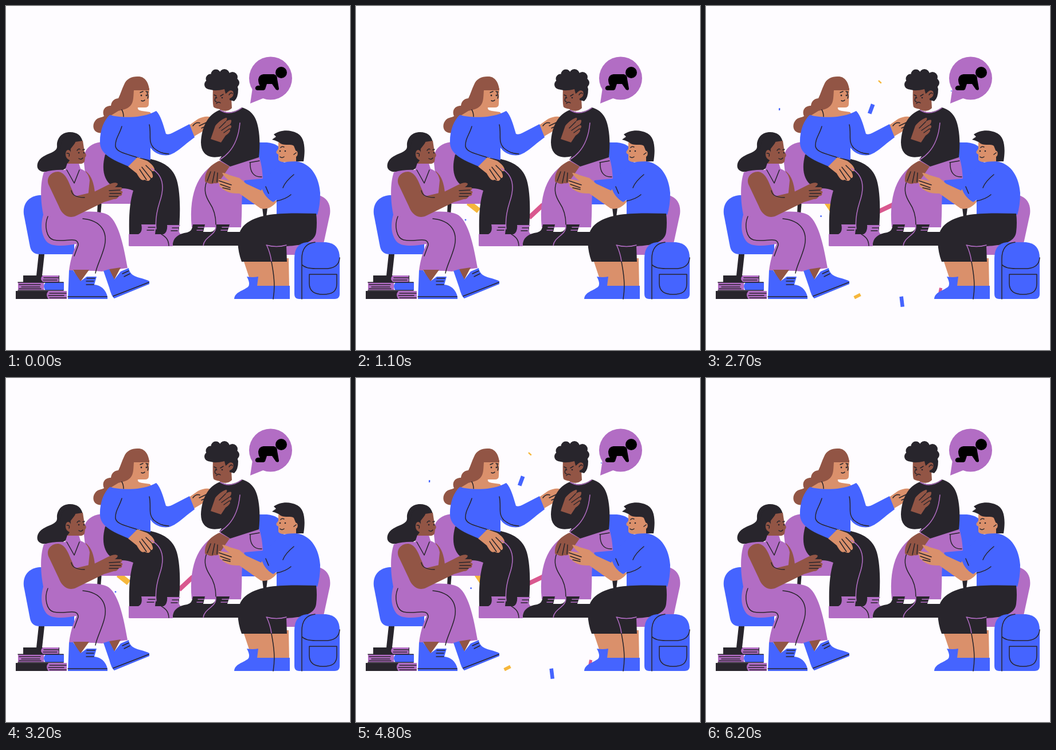
An HTML page for the animation above (6300 ms loop, 600x600 px).

```html
<!DOCTYPE html>
<html lang="en">
<head>
<meta charset="utf-8">
<title>Support group</title>
<style>
html, body { margin: 0; width: 100%; height: 100%; overflow: hidden; background: #fefcff; }
svg { display: block; width: 100vw; height: 100vh; }
.b { fill: #4564ff; } .p { fill: #b26dc4; } .k { fill: #28252c; }
.s { fill: #da906b; } .m { fill: #925545; }
.l, .lp { fill: none; stroke: #28252c; stroke-width: 1.5; stroke-linecap: round; stroke-linejoin: round; }
.lp { stroke: #b26dc4; }
#confetti line { stroke-linecap: butt; }
</style>
</head>
<body>
<svg viewBox="0 0 600 600">
<rect width="600" height="600" fill="#fefcff"/>
<g id="confetti"></g>

<g id="chairs">
  <path class="k" d="M160 340H167L165 364H159ZM446 344H457L454 368H449Z"/>
  <path class="p" d="M135 264C138 247 151 237 172 237L200 300L226 320V345H160C148 345 142 335 141 320Z"/>
  <path class="b" d="M436 238H455C476 240 486 251 485 270L470 338Q467 345 456 346H405L420 260Z"/>
  <path class="b" d="M58 330C39 332 29 345 31 363L42 420Q45 433 59 433H119V400L70 330Z"/>
  <path class="k" d="M57 433H67L63 470H53Z"/>
  <path class="p" d="M546 330C561 335 567 347 565 363L554 414Q551 433 534 434H489V405L530 380Z"/>
</g>

<g id="longHair">
  <path class="s" d="M220 143H250L249 171Q249 177 242 177H230C228 184 242 183 251 185L258 194L205 199L181 190C190 180 201 180 211 176Z"/>
  <path class="m" d="M229 123C242 122 249 133 250 147H223C222 158 223 167 217 174C211 180 204 181 196 183L183 191C176 195 174 201 175 209C175 218 169 223 161 221C152 219 150 208 155 201C159 194 167 195 171 192C167 184 171 174 183 174C184 166 188 162 196 161C200 153 202 145 206 137C210 127 219 123 229 123Z"/>
  <path class="l" d="M202 181Q205 186 205 193M246 151Q249 158 247 161M234 151L239 149M244 149L248 150M236 165Q240 167 242 164"/>
  <circle class="k" cx="236" cy="156" r="1.4"/><circle class="k" cx="245" cy="156" r="1.4"/>
  <path class="s" d="M318 209L335 197C343 193 354 191 358 195Q359 199 352 201C359 201 359 206 352 208C357 211 351 217 344 218L327 228Z"/>
  <path class="l" d="M326 209Q331 202 338 204M337 209L352 202M341 213L353 208"/>
  <path class="k" d="M173 259C166 285 171 303 184 313C195 320 210 316 222 322C216 341 214 365 215 398H301C304 368 305 329 298 304C292 283 275 270 246 266Z"/>
  <path class="b" d="M181 190C202 196 238 196 262 183C270 191 274 206 279 223Q284 225 291 221L320 206L329 229C313 240 299 256 284 260C270 262 258 256 252 247V269L231 264L214 280C192 270 166 262 164 240C163 219 170 200 181 190Z"/>
  <path class="l" d="M202 210C198 224 190 232 191 245C193 255 210 258 231 265M250 207C254 225 247 237 258 248Q270 258 284 258"/>
  <path class="s" d="M229 264L246 270C254 275 260 282 259 287Q257 290 252 286C258 296 257 301 252 300C252 306 246 306 242 303C236 306 232 299 228 292L213 280Z"/>
  <path class="l" d="M237 281L252 300M233 285L245 303M244 278L253 287"/>
  <path class="p" d="M214 418V398H231Q239 394 236 381H262L260 398H275Q282 394 281 382H304C298 389 302 396 306 399Q289 405 291 419H218Q214 419 214 418Z"/>
  <path class="k" d="M261 379L277 379L281 382Q282 390 276 393L262 391Z"/>
  <path class="l" d="M248 386H260M246 391H258M290 387H301M288 392H299M262 389C270 402 283 399 284 418"/>
  <path class="lp" d="M253 283C277 296 276 319 268 342C262 361 260 374 262 389"/>
</g>

<g id="curly">
  <path class="p" d="M378 268C338 284 318 322 324 386H410C413 350 409 326 416 304L448 301C447 282 444 266 438 256Z"/>
  <path class="k" d="M291 418C290 405 301 397 316 395Q325 393 326 381H347L344 394H357Q366 393 367 381H390L386 394H408Q414 404 412 418Z"/>
  <path class="l" d="M350 306C344 322 349 333 355 343Q366 359 366 381M426 273C425 289 432 299 446 298M425 273L442 270"/>
  <path class="lp" d="M366 385C366 400 346 402 344 418M335 386H345M333 391H343M377 386H388M375 391H386"/>
  <path class="m" d="M361 143H392L394 178Q386 186 374 181C371 178 366 180 362 176Q360 171 361 143Z"/>
  <g class="k">
    <circle cx="354" cy="137" r="8"/><circle cx="357" cy="127" r="8.500"/><circle cx="366" cy="119" r="8.500"/>
    <circle cx="381" cy="119" r="9"/><circle cx="395" cy="124" r="9"/><circle cx="398" cy="134" r="9"/>
    <path d="M357 122H398L405 145Q405 160 398 166L390 164L389 150L383 153L381 145Q369 148 362 147L352 145Z"/>
  </g>
  <path class="m" d="M384 153Q391 144 396 149Q399 159 388 162Z"/>
  <path class="l" d="M363 155L367 157M374 157L379 154M366 159Q362 166 367 167M367 170Q370 166 374 169M389 155Q393 149 395 153"/>
  <circle class="k" cx="367" cy="160" r="1.3"/><circle class="k" cx="377" cy="160" r="1.3"/>
  <path class="k" d="M374 181Q391 191 411 177C428 181 437 194 440 213C443 229 443 246 441 264L391 280L372 268L376 262C354 268 340 258 340 238C341 212 352 188 374 181Z"/>
  <path class="lp" d="M374 182Q391 192 411 178M408 204C405 239 391 257 373 268"/>
  <path class="m" d="M372 270L390 280L374 303C372 309 367 310 363 309C357 312 354 309 351 308Q346 308 347 303C347 290 354 278 372 270Z"/>
  <path class="m" d="M357 232L365 209C371 201 382 194 385 195Q387 199 380 204C388 198 394 197 393 201Q393 205 388 209C394 206 395 211 390 215C393 217 389 222 383 226L375 238Z"/>
  <path class="l" d="M372 213L383 202M376 217L389 208M380 221L390 214M357 289L351 305M364 289L360 308M369 291L368 307"/>
</g>

<g id="bubble">
  <circle class="p" cx="461.500" cy="126" r="37.500"/><path class="p" d="M430 143L426 170L451 160Z"/>
  <circle cx="480" cy="116" r="10"/>
  <path d="M449 119H467Q473 120 473 127L476 144Q476 148 471 146L464 136H455L452 145Q451 147 447 147H438Q434 146 435 142Q437 138 443 139Q440 135 440 128Q441 120 449 119Z"/>
</g>

<g id="darkHair">
  <path class="m" d="M139 288C150 297 153 309 155 325L135 333Z"/>
  <path class="k" d="M112 220C96 220 88 232 89 245C89 258 64 256 56 272C51 284 59 291 73 289C93 291 111 285 111 270L119 241L134 238C132 226 124 220 112 220Z"/>
  <path class="p" d="M66 290Q83 285 103 286L107 274L127 274L130 284Q143 288 146 304L142 344L129 368H66C60 342 59 310 66 290Z"/>
  <path class="m" d="M112 241Q120 243 121 237L134 235L137 255Q142 260 138 264L137 271Q135 276 127 275H107L111 269Q103 265 104 257C105 249 111 250 113 255Z"/>
  <path class="k" d="M96 250C94 232 106 225 121 228L119 241L112 250Z"/>
  <path class="l" d="M106 286L119 309L128 286M124 252Q127 248 129 250M134 251L137 250M127 266Q131 269 134 265M106 257Q112 256 110 262"/>
  <circle class="k" cx="127" cy="256" r="1.3"/><circle class="k" cx="136" cy="256" r="1.3"/>
  <path class="p" d="M67 358C59 380 61 400 72 412C82 421 107 418 123 415C116 430 112 446 110 461L155 462L167 463L212 457C206 424 198 379 179 365C163 355 134 360 108 358Z"/>
  <path class="m" d="M91 289C105 291 109 307 115 320L120 332L154 324L176 313C185 308 192 307 195 310Q194 314 189 316L201 316Q205 320 199 322Q206 323 202 327Q204 331 196 332Q195 337 188 337L171 342L122 366C106 373 96 360 92 349L75 313C69 301 77 289 91 289Z"/>
  <path class="l" d="M114 322Q116 334 137 334M180 322L199 321M181 327L200 327M180 332L196 332M73 367C66 384 71 405 83 408C103 413 126 400 126 417Q123 425 119 436M134 371C165 374 179 393 171 422C166 440 158 454 156 466"/>
  <path class="m" d="M117 460H145L129 482ZM180 459L200 456L187 481Z"/>
  <path class="b" d="M110 461H117L130 480L141 472H158L154 486Q172 488 177 507V511H108ZM170 462L180 459L189 477L200 463L214 457C217 475 235 472 250 480V485L189 510Q184 507 180 491Z"/>
  <path class="l" d="M108 507H176M187 506L249 482M141 475H155M140 480H153M140 486H153M203 467L214 462M206 472L216 467"/>
</g>

<g id="books">
  <path class="k" d="M30 470H93V482H30ZM17 497H106V511H17Z"/>
  <path class="p" d="M21 482H66V496H21ZM106 497H74Q68 504 74 511H106ZM92 470H64Q58 476 64 481H92Z"/>
  <path class="b" d="M101 482H69Q63 489 69 496H101Z"/>
  <path class="l" d="M21 482H100M21 496H100M23 486H60M27 490H59M23 493H61M76 501H105M74 505H101M76 509H105M66 474H92M65 478H89"/>
</g>

<g id="shortHair">
  <path class="s" d="M413 440H493L494 491H430ZM475 238H510L513 271L489 276V272Q477 273 475 268V259Q470 257 472 253L475 249Z"/>
  <path class="k" d="M464 233Q475 236 479 240C488 244 497 240 502 244L506 254V271H519C523 246 520 228 508 222C493 214 477 217 467 224L471 228Z"/>
  <path class="s" d="M500 255Q505 250 508 254Q511 262 502 265Z"/>
  <path class="l" d="M479 247Q481 244 485 246M478 263Q481 266 485 263M502 259L506 256"/>
  <circle class="k" cx="478" cy="253" r="1.3"/><circle class="k" cx="487" cy="253" r="1.3"/>
  <path class="s" d="M377 291Q382 291 390 295L407 300L419 310L445 322L451 312L472 342Q459 357 444 353L407 327C391 328 380 322 376 317Q370 314 373 311Q368 307 372 305Q369 301 375 302L390 305Q380 298 377 291Z"/>
  <path class="l" d="M372 305L393 312M374 311L391 317M378 317L391 320"/>
  <path class="b" d="M481 274Q488 271 506 271C532 274 546 298 548 326Q548 348 543 364H472V338L466 342Q449 333 444 311C455 299 469 284 481 274Z"/>
  <path class="l" d="M502 294C492 302 486 309 483 317M472 340Q488 337 497 329M453 315L458 327"/>
  <path class="k" d="M541 362C490 361 443 359 417 381C401 395 402 421 411 446H490L489 419C511 418 539 414 541 394Q543 378 541 362Z"/>
  <path class="lp" d="M454 417Q472 422 489 417M455 418Q461 431 463 445"/>
  <path class="b" d="M420 472Q430 474 440 472L438 488H495V511H398C399 499 413 497 422 490Q427 485 420 472Z"/>
  <path class="l" d="M463 446C467 467 470 488 466 511"/>
</g>

<g id="bag">
  <path class="b" d="M525 412H558Q582 414 582 440V502Q582 511 573 511H511Q503 511 503 502V440Q503 414 525 412Z"/>
  <path class="l" d="M539 412C521 414 516 426 516 441V511M516 451Q522 458 540 458H561Q581 456 582 439M529 468H577V484C577 498 569 503 553 503C537 503 529 497 529 484Z"/>
</g>
</svg>
<script>
const LOOP = 6300, CYCLE = 2100, STEP = 100, START = 200;
const COLORS = ['#f6b73c', '#d9588f', '#4564ff'];
const layer = document.getElementById('confetti');

let seed = 17;
const rnd = () => (seed = (seed * 16807) % 2147483647) / 2147483647;

// Late pieces that settle near the middle
const pieces = [
  { x: 205, y: 350, a: 38, len: 23, w: 10, color: COLORS[0], life: 1200 },
  { x: 314, y: 358, a: -43, len: 33, w: 8, color: COLORS[1], life: 1200 },
  { x: 191, y: 373, a: 0, len: 2.5, w: 2.5, color: COLORS[2], life: 1200 }
];
for (let i = 0; i < 24; i++) {
  const dir = i / 24 * 2 * Math.PI + rnd() * 0.2, far = 0.5 + rnd() * 0.45;
  pieces.push({
    x: 300 + 270 * far * Math.cos(dir),
    y: 300 + 235 * far * Math.sin(dir),
    a: rnd() * 180, len: 10 + rnd() * 10, w: 5 + rnd() * 3,
    color: COLORS[i % 3], life: 400 + rnd() * 300
  });
}
for (const p of pieces) {
  p.el = document.createElementNS('http://www.w3.org/2000/svg', 'line');
  p.el.setAttribute('x1', -p.len / 2);
  p.el.setAttribute('x2', p.len / 2);
  p.el.setAttribute('stroke', p.color);
  p.el.setAttribute('stroke-width', p.w);
  layer.append(p.el);
}

function draw(ms) {
  const t = Math.floor((ms % LOOP) / STEP) * STEP % CYCLE;
  for (const p of pieces) {
    const u = (t - START) / p.life;
    const on = u > 0 && u < 1;
    p.el.setAttribute('visibility', on ? 'visible' : 'hidden');
    if (!on) continue;
    const k = 1 - Math.pow(1 - Math.min(1, u / 0.6), 3);
    const size = Math.min(1, (1 - u) / 0.25);
    const x = 300 + (p.x - 300) * k, y = 300 + (p.y - 300) * k;
    p.el.setAttribute('transform',
      `translate(${x} ${y}) rotate(${p.a + (1 - k) * 200}) scale(${size})`);
  }
}

const t0 = performance.now();
function tick() {
  draw(performance.now() - t0);
  requestAnimationFrame(tick);
}
tick();
</script>
</body>
</html>
```
